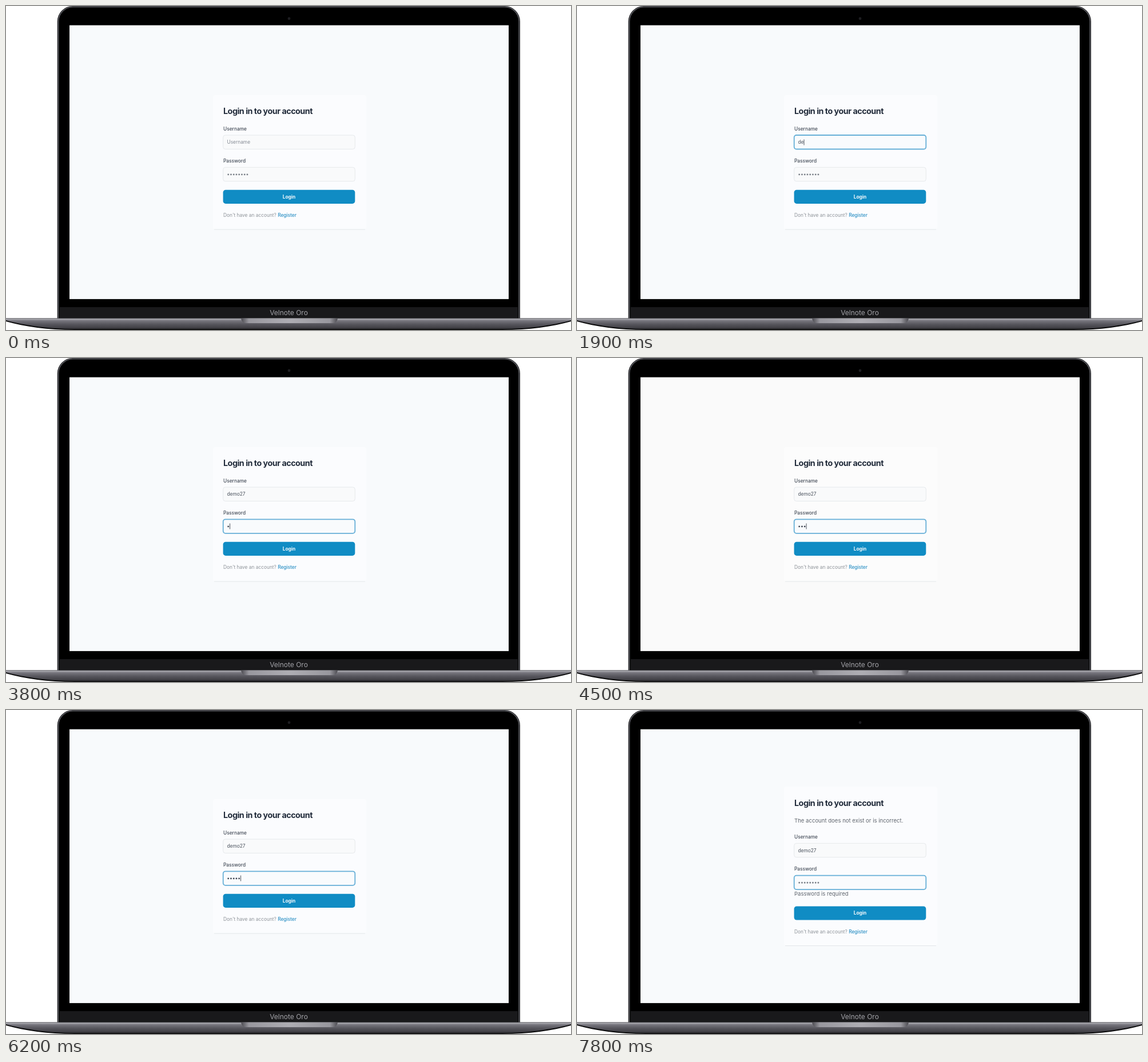
An HTML page for the animation above (8000 ms loop, 988x567 px).

```html
<!DOCTYPE html>
<html lang="en">
<head>
<meta charset="utf-8">
<title>Login form</title>
<style>
  html, body { margin: 0; width: 100%; height: 100%; overflow: hidden; background: #fff; }
  svg { display: block; width: 988px; height: 567px; font: 8.35px Inter, Roboto, sans-serif; }
  .title { font-size: 14.3px; font-weight: 700; letter-spacing: -.034em; fill: #222c3b; }
  .label { font-weight: 500; fill: #434b57; }
  .value { fill: #4b535e; }
  .value.empty { fill: #858b94; }
  .note { font-size: 9.57px; fill: #60666e; }
  .hint { fill: #8d9298; }
  .link { font-weight: 500; fill: #2a8fc4; }
  .field { fill: #f9fafb; stroke: #e6e9ec; stroke-width: 1; }
  .field.focus { fill: #f9fbfd; stroke: #66afd7; stroke-width: 1.8; }
  .dots { stroke: #434a56; stroke-width: 2.9; stroke-linecap: round; stroke-dasharray: 0 4.75; }
  .dots.empty { stroke: #7b8189; }
  .caret { stroke: #3c424b; stroke-width: .9; }
</style>
</head>
<body>
<svg viewBox="0 0 988 567">
  <defs>
    <linearGradient id="metal" x2="0" y2="1">
      <stop offset="0" stop-color="#85858c"/>
      <stop offset=".1" stop-color="#a3a3a9"/>
      <stop offset=".22" stop-color="#77767e"/>
      <stop offset=".55" stop-color="#57565d"/>
      <stop offset=".85" stop-color="#434248"/>
      <stop offset="1" stop-color="#29292c"/>
    </linearGradient>
    <linearGradient id="notch">
      <stop offset="0" stop-color="#4b4a50"/>
      <stop offset=".08" stop-color="#98979e"/>
      <stop offset=".5" stop-color="#aeadb3"/>
      <stop offset=".92" stop-color="#98979e"/>
      <stop offset="1" stop-color="#4b4a50"/>
    </linearGradient>
  </defs>

  <rect id="stage" width="988" height="567" fill="#fff"/>

  <!-- lid -->
  <path d="M89.7 547V27A27 27 0 0 1 116.7 0H872A27 27 0 0 1 899 27V547Z" fill="#252528"/>
  <path d="M91.7 547V27A25.3 25.3 0 0 1 117 1.7H871.7A25.3 25.3 0 0 1 897 27V547" fill="#000" stroke="#66676d" stroke-width="1.3"/>
  <rect x="94" y="527" width="801" height="19.5" fill="#19191b"/>
  <circle cx="495" cy="22" r="2.4" fill="#1d1d21"/>
  <text x="494.5" y="541.3" text-anchor="middle" font-size="12" fill="#a3a3a8">Velnote Oro</text>

  <!-- base -->
  <path d="M0 546.5H988V552C955 561 915 567 868 567H120C73 567 33 561 0 552Z" fill="#0b0b0c"/>
  <path d="M0 546.5H988V550C955 559 912 565.5 862 565.5H126C76 565.5 33 559 0 550Z" fill="url(#metal)"/>
  <path d="M411 546.5H580Q579 555 571 555H420Q412 555 411 546.5Z" fill="url(#notch)"/>

  <rect id="screen" x="111" y="33.7" width="768" height="479.2" fill="#f8fafc"/>

  <!-- form -->
  <rect id="card" x="362" width="268" rx="4" fill="#fff" fill-opacity=".4"/>
  <path id="edge" stroke="#e3e6e9"/>
  <g id="head">
    <text class="title" x="380" y="189.2">Login in to your account</text>
    <text class="note" id="error" x="380" y="218.6">The account does not exist or is incorrect.</text>
  </g>
  <g id="fields">
    <text class="label" x="380" y="218">Username</text>
    <rect id="userBox" x="379.7" y="226" width="230.6" height="24.5" rx="4"/>
    <text id="user" x="386.5" y="241.3"></text>
    <path id="userCaret" class="caret" d="M0 233.5V243.5"/>
    <text class="label" x="380" y="274">Password</text>
    <rect id="passBox" x="379.7" y="282.3" width="230.6" height="24.5" rx="4"/>
    <line id="dots" x1="388.7" y1="294.9" y2="294.9"/>
    <path id="passCaret" class="caret" d="M0 289.5V299.5"/>
    <text class="note" id="required" x="380" y="318">Password is required</text>
  </g>
  <g id="tail">
    <rect x="379.6" y="321.7" width="230.7" height="24.2" rx="4.5" fill="#108cc4"/>
    <text x="495" y="336.8" text-anchor="middle" font-weight="700" fill="#f3f9fc">Login</text>
    <text class="hint" x="380" y="369">Don't have an account? <tspan class="link">Register</tspan></text>
  </g>
  <path id="pointer" d="M0 0V16L3.7 12.6L6.3 18.3L8.8 17.2L6.3 11.6H11Z" fill="#fff" stroke="#30343a" stroke-width="1" stroke-linejoin="round"/>
</svg>
<script>
  const LOOP = 8000, NAME = 'demo27';
  const $ = id => document.getElementById(id);

  // Offsets of each block, and the card's top and bottom.
  const layouts = {
    plain:   { head: 0, fields: 0, tail: 0, top: 156, bottom: 391 },
    wrong:   { head: -13.5, fields: 14.4, tail: 14.2, top: 142, bottom: 405.5 },
    missing: { head: -21.2, fields: 7.3, tail: 21.7, top: 134, bottom: 412.5 }
  };

  // Each step changes part of the state at its time.
  const steps = [
    [0, { focus: '', typed: 0, dots: 0, caret: false, pointer: null, layout: 'plain', stage: '#fff', screen: '#f8fafc' }],
    [300, { pointer: [478, 292] }],
    [400, { pointer: [502, 252] }],
    [700, { pointer: [512, 238], focus: 'user' }],
    [800, { pointer: [558, 216] }],
    [900, { pointer: [597, 198] }],
    [1300, { pointer: null, caret: true }],
    [1400, { typed: 1 }],
    [1900, { typed: 2 }],
    [2100, { typed: 3 }],
    [2700, { typed: 4 }],
    [2900, { typed: 5 }],
    [3000, { typed: 6 }],
    [3400, { focus: 'pass' }],
    [3800, { dots: 1 }],
    [4100, { dots: 2 }],
    [4500, { dots: 3, screen: '#fafafa' }],
    [4800, { dots: 4, screen: '#f8fafc' }],
    [5300, { dots: 5, caret: false }],
    [5500, { caret: true }],
    [6000, { caret: false }],
    [6200, { caret: true }],
    [6400, { layout: 'wrong' }],
    [6900, { caret: false, stage: '#fdf9f8', screen: '#fbfbfb' }],
    [7300, { layout: 'missing', dots: 0, caret: true, stage: '#fff', screen: '#f8fafc' }],
    [7800, { caret: false }]
  ];

  const show = (id, on) => { $(id).style.display = on ? '' : 'none'; };
  const move = (id, x, y) => $(id).setAttribute('transform', `translate(${x} ${y})`);

  function draw(s) {
    const place = layouts[s.layout];
    for (const id of ['head', 'fields', 'tail']) move(id, 0, place[id]);
    $('card').setAttribute('y', place.top);
    $('card').setAttribute('height', place.bottom - place.top);
    $('edge').setAttribute('d', `M364 ${place.bottom}H628`);
    $('stage').setAttribute('fill', s.stage);
    $('screen').setAttribute('fill', s.screen);
    show('error', s.layout !== 'plain');
    show('required', s.layout === 'missing');

    for (const id of ['user', 'pass'])
      $(id + 'Box').setAttribute('class', s.focus === id ? 'field focus' : 'field');
    $('user').textContent = NAME.slice(0, s.typed) || 'Username';
    $('user').setAttribute('class', s.typed ? 'value' : 'value empty');
    $('dots').setAttribute('class', s.dots ? 'dots' : 'dots empty');
    $('dots').setAttribute('x2', 388.7 + 4.75 * ((s.dots || 8) - 1) + .1);

    show('userCaret', s.caret && s.focus === 'user');
    show('passCaret', s.caret && s.focus === 'pass');
    move('userCaret', 387 + (s.typed ? $('user').getComputedTextLength() : 0), 0);
    move('passCaret', 386.8 + 4.75 * s.dots, 0);

    show('pointer', s.pointer);
    if (s.pointer) move('pointer', ...s.pointer);
  }

  let last = -1;
  function tick() {
    const time = performance.now() % LOOP;
    const past = steps.filter(([at]) => at <= time);
    if (past.length !== last) {
      last = past.length;
      draw(Object.assign({}, ...past.map(([, change]) => change)));
    }
    requestAnimationFrame(tick);
  }
  tick();
</script>
</body>
</html>
```
